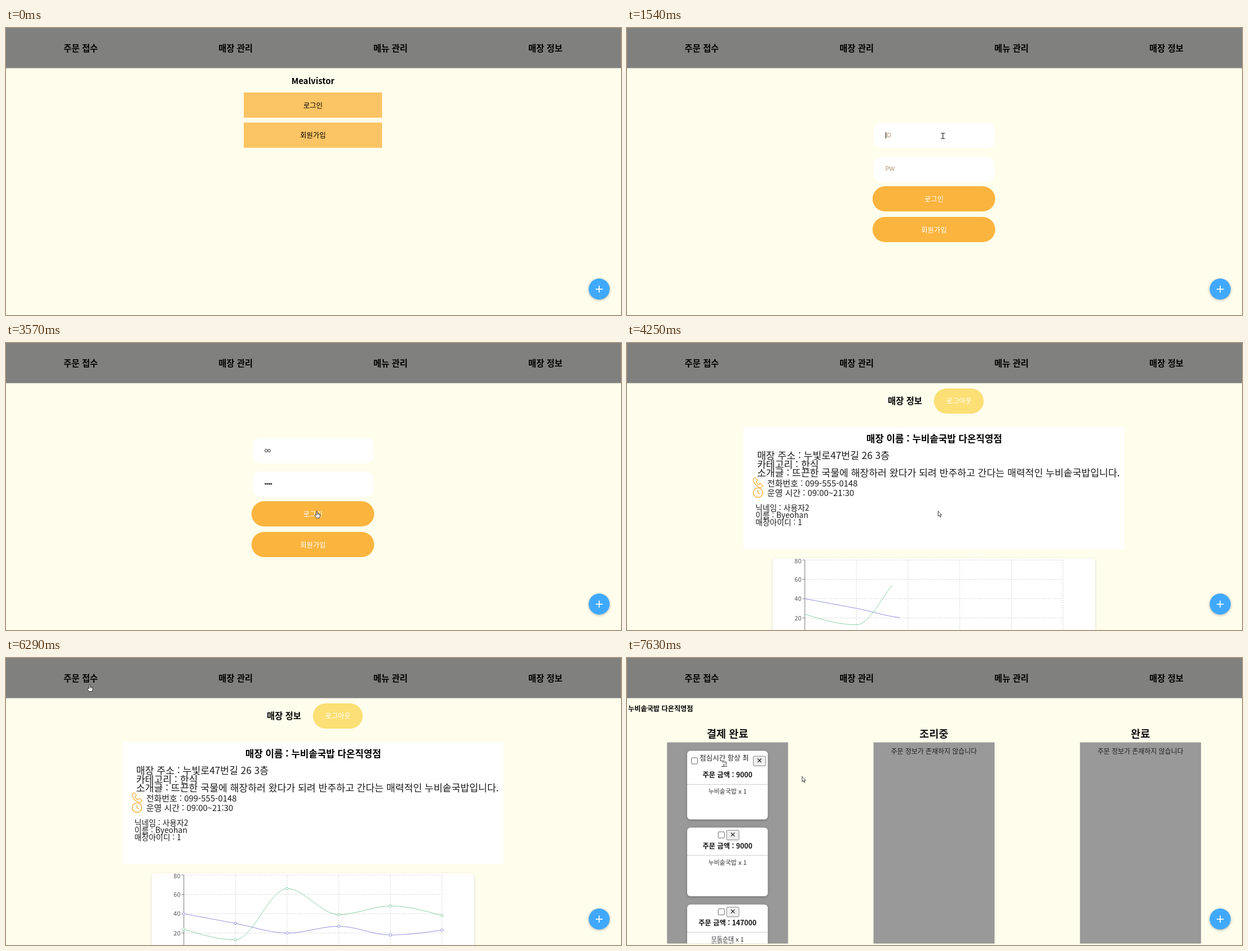
Animation of 1094x512 px, one loop 8 s. Source, as an HTML page:

```html
<!DOCTYPE html>
<html lang="ko">
<head>
<meta charset="utf-8">
<title>매장 관리</title>
<style>
  html, body { margin: 0; width: 100%; height: 100%; overflow: hidden; background: #fffdeb; }
  svg { display: block; width: 100%; height: 100%; }
  text { font-family: "Noto Sans CJK KR", "Noto Sans CJK", "Noto Sans", sans-serif; }
  .field { font-family: "Liberation Sans", sans-serif; }
  .shadow { filter: drop-shadow(0 1.5px 2px rgba(0, 0, 0, .3)); }
  .soft { filter: drop-shadow(0 1px 1.5px rgba(0, 0, 0, .2)); }
</style>
</head>
<body>
<svg id="stage" viewBox="0 0 1094 512" xmlns="http://www.w3.org/2000/svg"></svg>
<script>
const LOOP = 8000;
const SHOP = '누비솥국밥', BRANCH = SHOP + ' 다온직영점';

// Text is placed by its vertical centre.
const text = (x, cy, size, str, { fill = '#000', bold = false, anchor = 'middle' } = {}) =>
  `<text x="${x}" y="${cy + size * .37}" font-size="${size}" fill="${fill}" text-anchor="${anchor}"` +
  ` font-weight="${bold ? 700 : 350}">${str}</text>`;
const left = (x, cy, size, str, opts) => text(x, cy, size, str, { ...opts, anchor: 'start' });
const rect = (x, y, w, h, fill, rx = 0, extra = '') =>
  `<rect x="${x}" y="${y}" width="${w}" height="${h}" fill="${fill}" rx="${rx}" ${extra}/>`;
const line = (d, stroke, width = 1, extra = '') =>
  `<path d="${d}" fill="none" stroke="${stroke}" stroke-width="${width}" ${extra}/>`;
const group = (id, body) => `<g id="${id}">${body}</g>`;

function header() {
  const labels = ['주문 접수', '매장 관리', '메뉴 관리', '매장 정보'];
  return rect(0, 0, 1094, 71.6, '#80807f') +
    labels.map((s, i) => text(133 + i * 275.5, 36.5, 15.4, s, { bold: true })).join('');
}

const addButton = () =>
  `<circle cx="1055.2" cy="465.8" r="18.7" fill="#40a9ff" class="shadow"/>` +
  line('M1049 465.8h12.4M1055.2 459.6v12.4', '#fff', 1.7);

const home = () =>
  text(546, 94, 14.9, 'Mealvistor', { bold: true }) +
  rect(423, 115, 246, 45, '#fbc464') + text(546, 138.5, 12.4, '로그인') +
  rect(423, 168.7, 246, 45, '#fbc464') + text(546, 191, 12.4, '회원가입');

function login() {
  const input = y => rect(439, y, 215, 45.5, '#fff', 14);
  const pill = (y, s) => rect(436.7, y, 218.3, 45, '#fbb43e', 22.5) +
    text(546, y + 23, 12.4, s, { fill: '#fff' });
  return input(169) + input(229.2) + pill(282.3, '로그인') + pill(337, '회원가입') +
    '<text id="idText" class="field" x="459.7" y="195" font-size="10.2"/>' +
    '<text id="pwHint" class="field" x="459.7" y="255.2" font-size="10.2" fill="#a8906f">PW</text>' +
    '<g id="dots"></g>' + rect(460, 186, 1, 11, '#222', 0, 'id="caret"');
}

const chartX = i => 316.3 + i * 91.85;
const chartY = v => 525.2 - v * 1.726;

// Monotone cubic through equally spaced values.
function monotone(values) {
  const pts = values.map((v, i) => [chartX(i), chartY(v)]);
  const h = chartX(1) - chartX(0), n = pts.length;
  const s = pts.slice(1).map((p, i) => (p[1] - pts[i][1]) / h);
  const m = pts.map((p, i) => i && i < n - 1
    ? (Math.sign(s[i - 1]) + Math.sign(s[i])) *
      Math.min(Math.abs(s[i - 1]), Math.abs(s[i]), Math.abs(s[i - 1] + s[i]) / 4)
    : 0);
  m[0] = (3 * s[0] - m[1]) / 2;
  m[n - 1] = (3 * s[n - 2] - m[n - 2]) / 2;
  return pts.slice(1).reduce((d, [x, y], i) => {
    const [px, py] = pts[i];
    return d + `C${px + h / 3} ${py + m[i] * h / 3} ${x - h / 3} ${y - m[i + 1] * h / 3} ${x} ${y}`;
  }, `M${pts[0]}`);
}

function chart() {
  const series = [['#8884d8', [40, 30, 20, 27, 18, 23]], ['#82ca9d', [24, 13, 66, 39, 48, 38]]];
  const dash = 'stroke-dasharray="2.1 2.1"';
  let out = rect(259, 384, 574, 150, '#fff', 6, 'class="soft"');
  for (let i = 1; i < 6; i++) out += line(`M${chartX(i)} 387V512`, '#ccc', .9, dash);
  for (let v = 20; v <= 80; v += 20) {
    const y = chartY(v);
    out += line(`M316.3 ${y}H775.6`, '#ccc', .9, dash) + line(`M312 ${y}h4.3`, '#666', .8) +
      text(310.3, v === 80 ? y + 2 : y, 11, v, { fill: '#555', anchor: 'end' });
  }
  out += line('M316.3 387V512', '#666', .9);
  out += series.map(([c, v]) => line(monotone(v), c, .9, 'class="curve" pathLength="1"')).join('');
  return out + group('points', series.map(([c, v]) => v.map((y, i) =>
    `<circle cx="${chartX(i)}" cy="${chartY(y)}" r="2.2" fill="#fff" stroke="${c}" stroke-width=".9"/>`
  ).join('')).join(''));
}

function store() {
  const info = { fill: '#1c1c1c' };
  return text(494.5, 103, 15.4, '매장 정보', { bold: true }) +
    rect(546, 81, 88.5, 45, '#fcdf75', 22.5) + text(590.5, 103.7, 12.3, '로그아웃', { fill: '#fff' }) +
    rect(207, 149.5, 678, 218.5, '#fff', 2) +
    text(546.5, 171, 16.85, `매장 이름 : ${BRANCH}`, { bold: true }) +
    left(231.5, 200.5, 17.25, '매장 주소 : 누빛로47번길 26 3층', info) +
    left(231.5, 216.5, 17.25, '카테고리 : 한식', info) +
    left(231.5, 232, 17.25, `소개글 : 뜨끈한 국물에 해장하러 왔다가 되려 반주하고 간다는 매력적인 ${SHOP}입니다.`, info) +
    left(249.5, 250, 14.95, '전화번호 : 099-555-0148', info) +
    left(249.5, 267.7, 14.95, '운영 시간 : 09:00~21:30', info) +
    left(228.5, 293.5, 13.85, '닉네임 : 사용자2', info) +
    left(228.5, 307, 13.85, '이름 : Byeohan', info) +
    left(228.5, 319.5, 13.85, '매장아이디 : 1', info) +
    line('M225 242.6l2.2-2 q1-.6 1.7.4l2.6 3.6q.5 1-.3 1.8l-1.7 1.6q1.6 3.2 4.8 4.9l1.7-1.7q.8-.8 1.8-.2l3.2 2.3q1 .8.3 1.8l-1.6 1.7q-2 1.6-5 .2-7.3-3.4-9.8-10.8-.7-2.3.1-3.6Z', '#f9ae3a', 1.3) +
    '<circle cx="233" cy="267" r="8.4" fill="none" stroke="#f9ae3a" stroke-width="1.5"/>' +
    line('M233 262v5.4l3.2 1.7', '#f9ae3a', 1.3) + chart();
}

function orderCard(top, price, items, customer) {
  const shift = customer ? 10.5 : 0;
  const row = top + (customer ? 18 : 13);
  const boxX = customer ? 114.5 : 162.3, closeX = customer ? 224.7 : 177.2;
  const mark = closeX + 11;
  let out = rect(107, top, 143.5, 122.5, '#fff', 6, 'class="shadow"');
  if (customer) out += customer.map((s, i) => text(173, top + 13 + i * 11.6, 12.5, s, { fill: '#222' })).join('');
  out += rect(boxX, row - 5.5, 11, 11, '#fff', 1.6, 'stroke="#666" stroke-width="1"') +
    rect(closeX, row - 8.3, 22, 17.3, '#efefef', 1.8, 'stroke="#777" stroke-width=".9"') +
    line(`M${mark - 3.3} ${row - 4}l6.6 6.6m0-6.6l-6.6 6.6`, '#111', 1.2) +
    text(178.8, top + 32.8 + shift, 12.3, `주문 금액 : ${price}`, { fill: '#111', bold: true }) +
    line(`M107 ${top + 49.5 + shift}h143.5`, '#ccc');
  return out + items.map((s, i) => text(178.8, top + 62 + shift + i * 11, 11, `${s} x 1`, { fill: '#333' })).join('');
}

function orders() {
  const empty = '주문 정보가 존재하지 않습니다';
  const column = x => rect(x, 150.5, 215.3, 359, '#999');
  const title = (x, s) => text(x, 135.5, 18.6, s, { fill: '#111', bold: true });
  return left(2, 90, 12.2, BRANCH, { bold: true }) +
    title(178.7, '결제 완료') + title(546, '조리중') + title(913.3, '완료') +
    column(71.2) + column(438.5) + column(805.8) +
    text(546, 167, 11.95, empty, { fill: '#222' }) + text(913.3, 167, 11.95, empty, { fill: '#222' }) +
    '<clipPath id="list"><rect x="71" y="150" width="216" height="359.5"/></clipPath><g clip-path="url(#list)">' +
    orderCard(165.5, 9000, [SHOP], ['점심시간 항상 최', '고']) +
    orderCard(302.6, 9000, [SHOP]) +
    orderCard(439.7, 147000, ['모둠순대', '머리고기']) + '</g>';
}

// Each cursor has its hotspot at the origin.
const cursors = () =>
  group('arrow', '<path d="M.4.4V9.6L2.5 7.7l1.5 3.4 1.5-.6-1.5-3.3h2.8Z" fill="#fff" stroke="#111" stroke-width=".8"/>') +
  group('hand', '<path d="M-1 8V1.4Q-.9.4 0 .4T1 1.4V4.8Q2 4.1 2.7 5.1 3.6 4.5 4.3 5.5 5.7 5.1 5.7 6.6V9.4L4.6 12.6H-.7L-3.6 8.6Q-3.9 7.1-2.5 7Z" fill="#fff" stroke="#111" stroke-width=".8"/>' +
    line('M1 5V7.2M2.7 5.4V7.3M4.3 5.8V7.5', '#111', .6)) +
  group('beam', line('M-3.5-4.8H3.5M0-4.8V4.8M-3.5 4.8H3.5', '#555', 1.5));

const stage = document.getElementById('stage');
const screens = { home, login, store, orders };
stage.innerHTML = rect(0, 0, 1094, 512, '#fffdeb') + header() +
  Object.entries(screens).map(([id, draw]) => group(id, draw())).join('') + addButton() + cursors();

const el = id => document.getElementById(id);
const show = (node, on) => node.setAttribute('visibility', on ? 'inherit' : 'hidden');
const curves = [...document.querySelectorAll('.curve')];

// Timelines of held states: [start, ...values].
const screenAt = [[0, 'home'], [870, 'login'], [4250, 'store'], [6960, 'orders']];
const cursorAt = [
  [0, ''], [200, 'hand', 578, 176], [540, 'hand', 581, 139],
  [870, 'beam', 553, 230.5], [1210, 'beam', 566, 192], [1540, 'beam', 562, 192.5],
  [3230, 'beam', 558, 216], [3570, 'hand', 553, 299.5], [4250, 'arrow', 553, 299.5],
  [4930, 'arrow', 553, 274], [5940, 'arrow', 198, 73], [6290, 'hand', 148.5, 47], [7630, 'arrow', 311, 211]
];
const caretAt = [[0, 0], [1540, 460, 186], [1880, 0], [2220, 460, 246], [2890, 466.7, 246], [3230, 473.5, 246], [3570, 0]];
const dotsAt = [[0, 0], [2890, 2], [3230, 4]];
const curveAt = [[0, .37], [4590, .724], [4930, .98], [5270, 1]];
const at = (timeline, t) => timeline.findLast(([start]) => start <= t).slice(1);

function render(t) {
  const [screen] = at(screenAt, t);
  for (const id in screens) el(id).setAttribute('display', id === screen ? 'inline' : 'none');

  const typed = t >= 2220;
  el('idText').textContent = typed ? 'oo' : 'ID';
  el('idText').setAttribute('fill', typed ? '#111' : '#a8906f');
  const [count] = at(dotsAt, t);
  show(el('pwHint'), !count);
  el('dots').innerHTML = Array.from({ length: count }, (_, i) =>
    `<circle cx="${461.6 + i * 3.4}" cy="251.3" r="1.4" fill="#111"/>`).join('');
  const [caretX, caretY] = at(caretAt, t);
  show(el('caret'), caretX);
  if (caretX) {
    el('caret').setAttribute('x', caretX);
    el('caret').setAttribute('y', caretY);
  }

  const [drawn] = at(curveAt, t);
  curves.forEach(c => c.setAttribute('stroke-dasharray', drawn < 1 ? `${drawn} 2` : 'none'));
  show(el('points'), t >= 5610);

  const [kind, x, y] = at(cursorAt, t);
  for (const id of ['arrow', 'hand', 'beam']) {
    show(el(id), id === kind);
    if (id === kind) el(id).setAttribute('transform', `translate(${x} ${y})`);
  }
}

const began = performance.now();
function tick() {
  render((performance.now() - began) % LOOP);
  requestAnimationFrame(tick);
}
tick();
</script>
</body>
</html>
```
